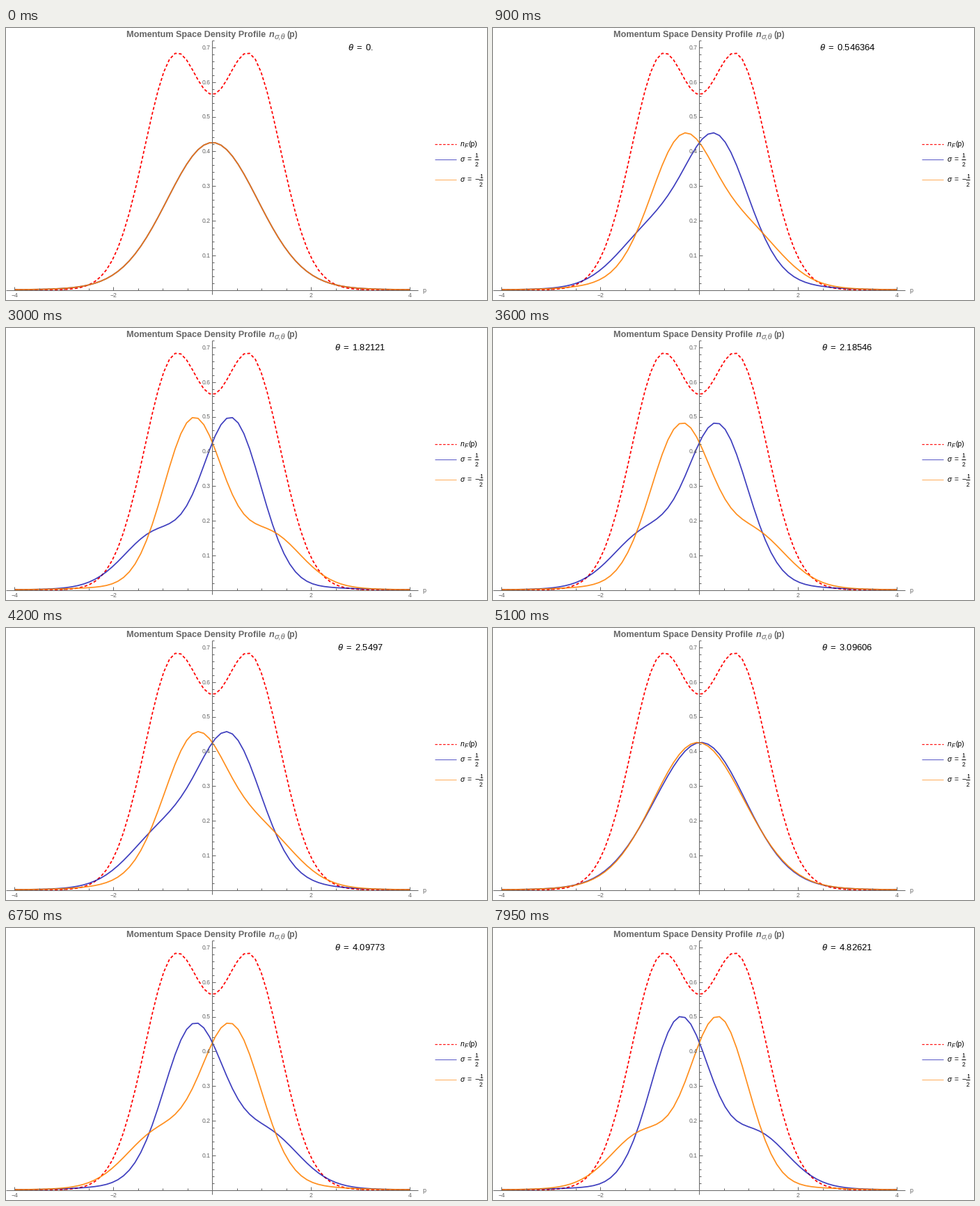
A matplotlib script for the animation above (8 s loop, 691 px wide and 391 px high).

```python
import numpy as np
import matplotlib.pyplot as plt
from matplotlib.animation import FuncAnimation

W, H, DPI = 691, 391, 64
PX = 72 / DPI  # points per pixel
X0, Y0, SX, SY = 296.5, 376.5, 71.0, 498.0
GREY = "#666666"
RED, BLUE, ORANGE = (1, 0, 0), (0, 0, 0.667), (1, 0.5, 0)
BLUE_ALPHA, ORANGE_ALPHA, KEY_ALPHA = 0.75, 0.88, 0.65
CURVE, KEY = 1.75, 1.0  # line widths in pixels
SAMPLES = 70
INTERVAL, LOOP, HOLD = 50, 8000, 150

plt.rcParams.update({
    "font.family": "Liberation Sans",
    "mathtext.fontset": "custom",
    "mathtext.rm": "Liberation Sans",
    "mathtext.it": "Liberation Sans:italic",
})


def sx(p):
    return X0 + SX * np.asarray(p)


def sy(n):
    return Y0 - SY * np.asarray(n)


def densities(p):
    """Two trapped hard-core particles: fermionic, mean and interference parts."""
    x = np.linspace(-6, 6, 301)
    h = x[1] - x[0]
    gap = x[:, None] - x[None, :]
    envelope = np.exp(-(x[:, None] ** 2 + x[None, :] ** 2) / 2) / np.sqrt(np.pi)
    kernel = np.exp(-1j * np.outer(p, x)) * h / np.sqrt(2 * np.pi)
    fermi = kernel @ (gap * envelope)
    bose = kernel @ (np.abs(gap) * envelope)
    n_fermi = (np.abs(fermi) ** 2).sum(axis=1) * h
    n_bose = (np.abs(bose) ** 2).sum(axis=1) * h
    cross = (fermi.conj() * bose).imag.sum(axis=1) * h
    return 2 * n_fermi, (n_fermi + n_bose) / 2, cross


p = np.linspace(-4, 4, SAMPLES)
n_total, n_mean, n_cross = densities(p)

fig = plt.figure(figsize=(W / DPI, H / DPI), dpi=DPI, facecolor="white")
ax = fig.add_axes([0, 0, 1, 1])
ax.set(xlim=(0, W), ylim=(H, 0))
ax.axis("off")


def label(x, y, s, size, color="black", ha="left", **kw):
    return ax.text(x, y, s, fontsize=size * PX, color=color, ha=ha,
                   va="baseline", **kw)


def line(x, y, color, width=1.0, dash=None, **kw):
    style = (0, [d / width for d in dash]) if dash else "-"
    return ax.plot(x, y, color=color, lw=width * PX, linestyle=style,
                   solid_capstyle="butt", **kw)[0]


def draw_axes():
    line([0, 592], [Y0, Y0], GREY)
    line([X0, X0], [18, 383], GREY)
    for k in range(-8, 9):
        x, major = float(sx(k / 2)), k % 4 == 0
        line([x, x], [Y0, Y0 - (5 if major else 3)], GREY)
        if major and k:
            label(x, 387, f"{k // 2}".replace("-", "\u2212"), 8.6, GREY, "center")
    for k in range(1, 37):
        y, major = float(sy(k / 50)), k % 5 == 0
        line([X0, X0 + (5 if major else 3)], [y, y], GREY)
        if major:
            label(293.5, y + 3, f"{k / 50:.1f}", 8.6, GREY, "right")
    label(598, 380, "p", 9, GREY)


def draw_title():
    label(173.5, 12.8, "Momentum Space Density Profile", 12.6, GREY, weight="bold")
    label(377.5, 12.8, "n", 12.6, GREY, style="italic", weight="bold")
    label(386, 15.5, "σ,θ", 11, GREY, style="italic")
    label(419, 12.8, "(p)", 12.4, GREY, "right", weight="bold")


def draw_half(x, y):
    label(x, y - 1.5, "1", 8.6, ha="center")
    label(x, y + 10.8, "2", 8.6, ha="center")
    line([x - 3, x + 3], [y + 0.5, y + 0.5], "black")


def draw_legend():
    span = [616, 647]
    line(span, [166.5] * 2, RED, 1.2, dash=(3.4, 2.4))
    label(652.5, 170, "n", 10.4, style="italic")
    label(659, 172, "F", 8.5, style="italic")
    label(677, 170, "(p)", 10.4, ha="right")
    for y, color in ((188.5, BLUE), (217.5, ORANGE)):
        line(span, [y, y], color, KEY, alpha=KEY_ALPHA)
        label(652.5, y + 3.5, r"$\sigma\,$ =", 10.4)
    draw_half(676, 188)
    label(673.5, 221, "\u2212", 10.4)
    draw_half(682.5, 217)


line(sx(p), sy(n_total), RED, CURVE, dash=(4.2, 3.0))
up = line(sx(p), sy(n_mean), BLUE, CURVE, alpha=BLUE_ALPHA)
down = line(sx(p), sy(n_mean), ORANGE, CURVE, alpha=ORANGE_ALPHA)
draw_axes()
draw_title()
draw_legend()
readout = label(509, 32.5, "", 12.9, ha="center")


def update(frame):
    step = frame * INTERVAL // HOLD
    theta = 2 * np.pi * step / (SAMPLES - 1)
    shift = np.sin(theta) * n_cross
    up.set_ydata(sy(n_mean + shift))
    down.set_ydata(sy(n_mean - shift))
    value = f"{theta:.6g}" if step else "0."
    readout.set_text(rf"$\theta\,$ =$\,$ {value}")
    return up, down, readout


anim = FuncAnimation(fig, update, frames=LOOP // INTERVAL, interval=INTERVAL,
                     repeat=True, repeat_delay=0)
plt.show()
```
